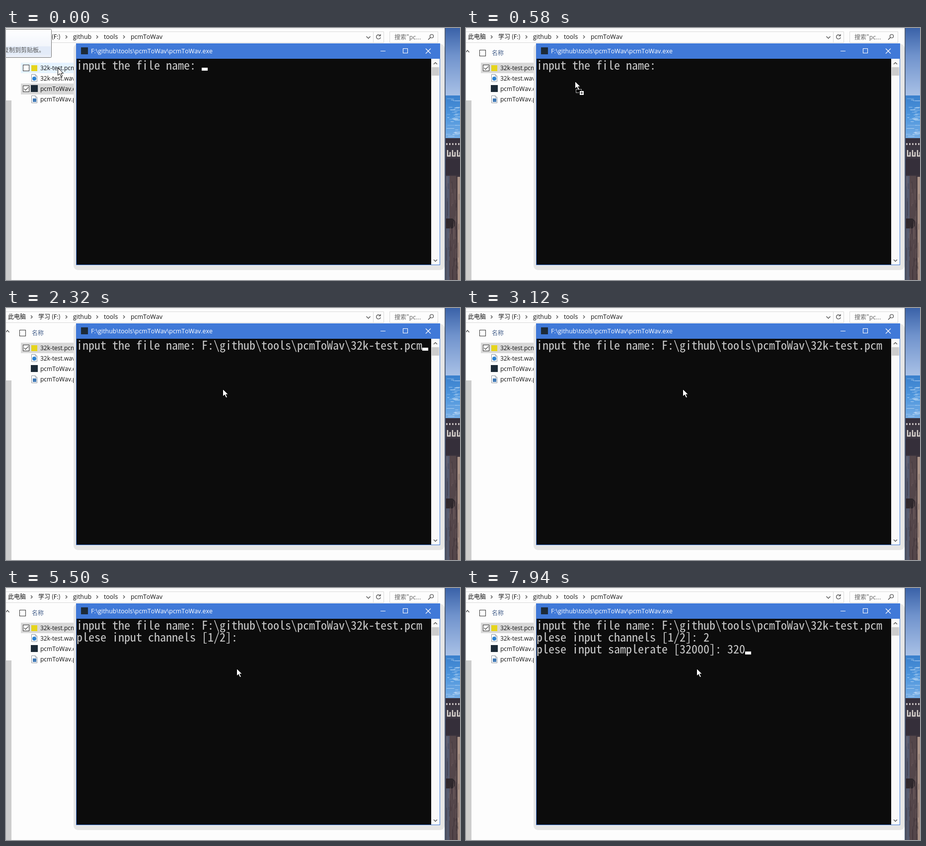
These frames come from a looping animation (914 by 508 pixels, 8 s). An HTML page:

```html
<!DOCTYPE html>
<html lang="zh-CN">
<head>
<meta charset="utf-8">
<title>pcmToWav</title>
<style>
  html, body { margin: 0; width: 100%; height: 100%; overflow: hidden; background: #fdfdfd; }
  svg { display: block; width: 914px; height: 508px; }
  text { font: 12.4px "Open Sans", "Noto Sans", "Noto Sans CJK SC", "Noto Sans CJK", sans-serif; font-kerning: none; fill: #111; white-space: pre; }
  .file { font-size: 12px; }
  .cjk { font: 12px "Noto Sans CJK SC", "Noto Sans CJK", sans-serif; }
  #console text { font-family: "Noto Sans Mono CJK SC", "Liberation Mono", monospace; font-weight: 300; fill: #ccc; }
  .line { fill: none; stroke: #d9d9d9; }
  .thin { fill: none; stroke: #444; stroke-width: 1.2; }
</style>
</head>
<body>
<svg viewBox="0 0 914 508" xmlns="http://www.w3.org/2000/svg">
  <defs>
    <linearGradient id="sky" x2="0" y2="1">
      <stop offset="0" stop-color="#3a62a8"/>
      <stop offset=".4" stop-color="#6f92cc"/>
      <stop offset="1" stop-color="#a9c1e6"/>
    </linearGradient>
    <linearGradient id="sea" x2="0" y2="1">
      <stop offset="0" stop-color="#3a80cc"/>
      <stop offset=".5" stop-color="#4f97de"/>
      <stop offset="1" stop-color="#78aee4"/>
    </linearGradient>
    <linearGradient id="wood" x2="0" y2="1">
      <stop offset="0" stop-color="#37313d"/>
      <stop offset="1" stop-color="#493c40"/>
    </linearGradient>
    <linearGradient id="tip" x2="0" y2="1">
      <stop offset="0" stop-color="#fff"/>
      <stop offset="1" stop-color="#e9eef8"/>
    </linearGradient>
    <g id="page">
      <path d="M2.5 .5h7.500l3.500 3.500v11h-11z" fill="#fff" stroke="#8d959e"/>
      <path d="M10 .5v3.500h3.500" fill="none" stroke="#8d959e"/>
    </g>
    <path id="chevron" d="M0 0l3 3-3 3" class="thin"/>
    <path id="arrow" d="M.5 .5v15l3.600-3.400 2.800 6 2.600-1.200-2.700-5.700h4.700z" fill="#fff" stroke="#000"/>
  </defs>

  <!-- desktop picture -->
  <g id="photo">
    <rect x="884" width="30" height="136" fill="url(#sky)"/>
    <rect x="884" y="136" width="30" height="88" fill="url(#sea)"/>
    <rect x="884" y="222" width="30" height="286" fill="url(#wood)"/>
    <path d="M886 234h28" stroke="#b9b3b4" stroke-width="4" stroke-dasharray="3 3"/>
    <rect x="884" y="238" width="30" height="25" fill="#3c3742"/>
    <path d="M889 246v12h5v-8M899 246v12h5v-8M909 246v12h5v-8" fill="none" stroke="#d8d2cd" stroke-width="2.500"/>
    <rect x="884" y="264" width="30" height="32" fill="#352f3a"/>
    <rect x="886" y="298" width="7" height="210" fill="#545a6e"/>
    <rect x="893" y="298" width="13" height="210" fill="#54464a"/>
    <rect x="906" y="300" width="3" height="208" fill="#4a3d41"/>
    <rect x="909" y="300" width="5" height="208" fill="#aa9387"/>
    <path d="M886 384h13l5 5v10l-5 5h-13z" fill="#2f282d"/>
  </g>

  <!-- file window -->
  <rect width="883" height="508" fill="#fdfdfd"/>
  <path d="M0 1.500H883" stroke="#e4e4e4"/>
  <path d="M884 0V508" stroke="#52627c" stroke-width="2"/>
  <path d="M0 7.500H760.500V29.500H0M739.500 7.500V29.500" class="line"/>
  <rect x="772.500" y="7.500" width="97" height="22" class="line"/>
  <path d="M725.500 17l4 4 4-4" class="thin"/>
  <path d="M753 15a4.300 4.300 0 1 0 1 4M754 12.500v3.500h-4" class="thin"/>
  <g class="thin"><circle cx="857" cy="16.500" r="3.500"/><path d="M854.500 19l-4.500 4.500"/></g>
  <text x="782" y="22.500" class="cjk" style="fill:#666">搜索"pc...</text>
  <text x="4" y="22" class="cjk">此电脑</text>
  <text x="65" y="22" class="cjk">学习 (F:)</text>
  <text x="135" y="22">github</text>
  <text x="197" y="22">tools</text>
  <text x="251" y="22">pcmToWav</text>
  <use href="#chevron" x="50" y="15"/>
  <use href="#chevron" x="120" y="15"/>
  <use href="#chevron" x="182" y="15"/>
  <use href="#chevron" x="236" y="15"/>
  <path d="M-.5 49l3.500-4 3.500 4" class="thin"/>
  <rect x="27.500" y="44.500" width="12" height="12" fill="#fff" stroke="#333"/>
  <text x="52" y="55" class="cjk" style="fill:#46618c">名称</text>
  <rect y="146" width="11" height="362" fill="#cdcdcd"/>

  <rect id="row0" x="30" y="70" width="112" height="21"/>
  <rect id="row2" x="30" y="112" width="112" height="22" fill="#d9d9d9"/>
  <rect x="34.500" y="74.500" width="12" height="12" fill="#fff" stroke="#333"/>
  <path id="tick0" d="M36.500 80.500l3 3 5.500-6" class="thin"/>
  <g id="box2">
    <rect x="34.500" y="116.500" width="12" height="12" fill="#fff" stroke="#333"/>
    <path d="M36.500 122.500l3 3 5.500-6" class="thin"/>
  </g>
  <rect x="51" y="75" width="12" height="12" fill="#e6d51f"/>
  <use href="#page" x="49" y="93"/><circle cx="57" cy="102" r="4" fill="#2d83d2"/>
  <rect x="50" y="115" width="14" height="14" fill="#1d2b38"/>
  <use href="#page" x="49" y="136"/><rect x="54" y="142" width="7" height="7" fill="#3f78b5"/>
  <text x="69" y="85" class="file">32k-test.pcm</text>
  <text x="69" y="106" class="file">32k-test.wav</text>
  <text x="69" y="127" class="file">pcmToWav.exe</text>
  <text x="69" y="148" class="file">pcmToWav.py</text>

  <!-- console window -->
  <g id="console">
    <rect x="136" y="32" width="747" height="456" rx="9" fill="#e6e6e6"/>
    <rect x="141" y="31" width="733" height="447" fill="#4079d8"/>
    <rect x="142" y="62" width="714" height="415" fill="#0c0c0c"/>
    <rect x="151" y="39" width="14" height="14" fill="#1d2b38"/>
    <path d="M754 46.500h10M799.500 41.500h9v9h-9zM845 41.500l10 10M855 41.500l-10 10" fill="none" stroke="#fff" stroke-width="1.100"/>
    <rect x="856" y="62" width="17" height="415" fill="#fafafa"/>
    <rect x="857" y="79" width="15" height="17" fill="#cdcdcd"/>
    <path d="M861 73l3.500-3.500 3.500 3.500M861 467l3.500 3.500 3.500-3.500" class="thin"/>
    <rect id="cell" x="430" y="158" width="12" height="24" fill="#f2f2f2"/>
    <text id="line0" x="142" y="84"/>
    <text id="line1" x="142" y="108"/>
    <text id="line2" x="142" y="132"/>
    <rect id="caret" width="12" height="6" fill="#fff"/>
  </g>
  <text id="title" x="171" y="51" style="fill:#fff"/>

  <g id="tooltip">
    <rect x="-3" y="2.500" width="94.500" height="57" rx="2" fill="url(#tip)" stroke="#767676"/>
    <rect y="37" width="90" height="17" fill="#e3ebf8"/>
    <text x="-6" y="49" class="cjk" style="fill:#575757">复制到剪贴板。</text>
  </g>
  <rect id="ghost" x="73" y="0" width="96" height="92" fill="#e6d51f" opacity=".22"/>
  <g id="mouse">
    <use href="#arrow"/>
    <g id="badge">
      <rect x="2.500" y="16.500" width="11" height="7" fill="none" stroke="#fff" stroke-dasharray="2 1"/>
      <rect x="9.500" y="19.500" width="9" height="9" fill="#fff" stroke="#000"/>
      <path d="M11.500 24h5M14 21.500v5" stroke="#000"/>
    </g>
  </g>
</svg>
<script>
const LOOP = 8000;
const CELL = 12;
const path = "F:\\github\\tools\\pcmToWav\\";
const file = path + "32k-test.pcm";
const ask = [
  "input the file name: ",
  "plese input channels [1/2]: ",
  "plese input samplerate [32000]: "
];
const el = id => document.getElementById(id);
const show = (id, on) => el(id).setAttribute("visibility", on ? "visible" : "hidden");

// Each step holds only what changes; "typed" lists the answers so far.
const steps = [
  [0, { typed: [""], caret: 1, mouse: [104, 80], hover: 1, drag: 0, ghost: 0, select: 0 }],
  [280, { caret: 0, hover: 0 }],
  [430, { mouse: [121, 84], ghost: 1 }],
  [580, { mouse: [219, 107], ghost: 0, drag: 1 }],
  [700, { mouse: [290, 125] }],
  [820, { mouse: [352, 141], caret: 1 }],
  [940, { mouse: [403, 154] }],
  [1060, { mouse: [435, 161] }],
  [1210, { mouse: [436, 163], typed: [file] }],
  [1330, { drag: 0 }],
  [1760, { caret: 0 }],
  [2320, { caret: 1 }],
  [2720, { select: 1 }],
  [2840, { caret: 0 }],
  [3120, { select: 0 }],
  [3400, { caret: 1 }],
  [3900, { caret: 0 }],
  [4300, { mouse: [445, 162] }],
  [4420, { mouse: [453, 162], caret: 1 }],
  [4570, { mouse: [464, 162] }],
  [4820, { typed: [file, ""] }],
  [5500, { caret: 0 }],
  [5930, { typed: [file, "2"] }],
  [6050, { caret: 1 }],
  [6300, { typed: [file, "2", ""] }],
  [7050, { typed: [file, "2", "3"] }],
  [7170, { typed: [file, "2", "32"] }],
  [7540, { caret: 0 }],
  [7940, { typed: [file, "2", "320"], caret: 1 }]
];

function draw(s) {
  ask.forEach((q, i) => el("line" + i).textContent = i < s.typed.length ? q + s.typed[i] : "");
  const row = s.typed.length - 1;
  el("caret").setAttribute("x", 142 + CELL * (ask[row] + s.typed[row]).length);
  el("caret").setAttribute("y", 80 + 24 * row);
  show("caret", s.caret);
  el("mouse").setAttribute("transform", `translate(${s.mouse})`);
  show("badge", s.drag);
  show("ghost", s.ghost);
  show("cell", s.select);
  el("title").textContent = (s.select ? "选择" : "") + path + "pcmToWav.exe";
  ["tooltip", "row2", "box2"].forEach(id => show(id, s.hover));
  show("tick0", !s.hover);
  el("row0").setAttribute("fill", s.hover ? "#e5f3ff" : "#d9d9d9");
}

// Font size at which one console letter fills one cell.
function fitConsole() {
  const lines = ask.map((_, i) => el("line" + i));
  const ctx = document.createElement("canvas").getContext("2d");
  ctx.font = "100px " + getComputedStyle(lines[0]).fontFamily;
  const size = 100 * CELL / ctx.measureText("m").width;
  lines.forEach(l => l.style.fontSize = size + "px");
}

// Ripples on the water and grain in the wood.
function texture() {
  let seed = 7;
  const rnd = () => (seed = seed * 16807 % 2147483647) / 2147483647;
  const strip = (x, y, w, h, fill, opacity) => {
    const r = document.createElementNS("http://www.w3.org/2000/svg", "rect");
    Object.entries({ x, y, width: w, height: h, fill, opacity }).forEach(([k, v]) => r.setAttribute(k, v));
    el("photo").append(r);
  };
  for (let i = 0; i < 40; i++) strip(886 + rnd() * 20, 142 + rnd() * 78, 4 + rnd() * 16, 1, "#e4f0fc", .3 + rnd() * .4);
  for (let i = 0; i < 50; i++) strip(886 + rnd() * 27, 298 + rnd() * 190, 1, 8 + rnd() * 30, i % 2 ? "#231c24" : "#9a8580", .35);
}

let shown = -1;
function tick() {
  const t = performance.now() % LOOP;
  const now = steps.findLastIndex(s => s[0] <= t);
  if (now !== shown) {
    shown = now;
    draw(Object.assign({}, ...steps.slice(0, now + 1).map(s => s[1])));
  }
  requestAnimationFrame(tick);
}

texture();
fitConsole();
tick();
</script>
</body>
</html>
```
